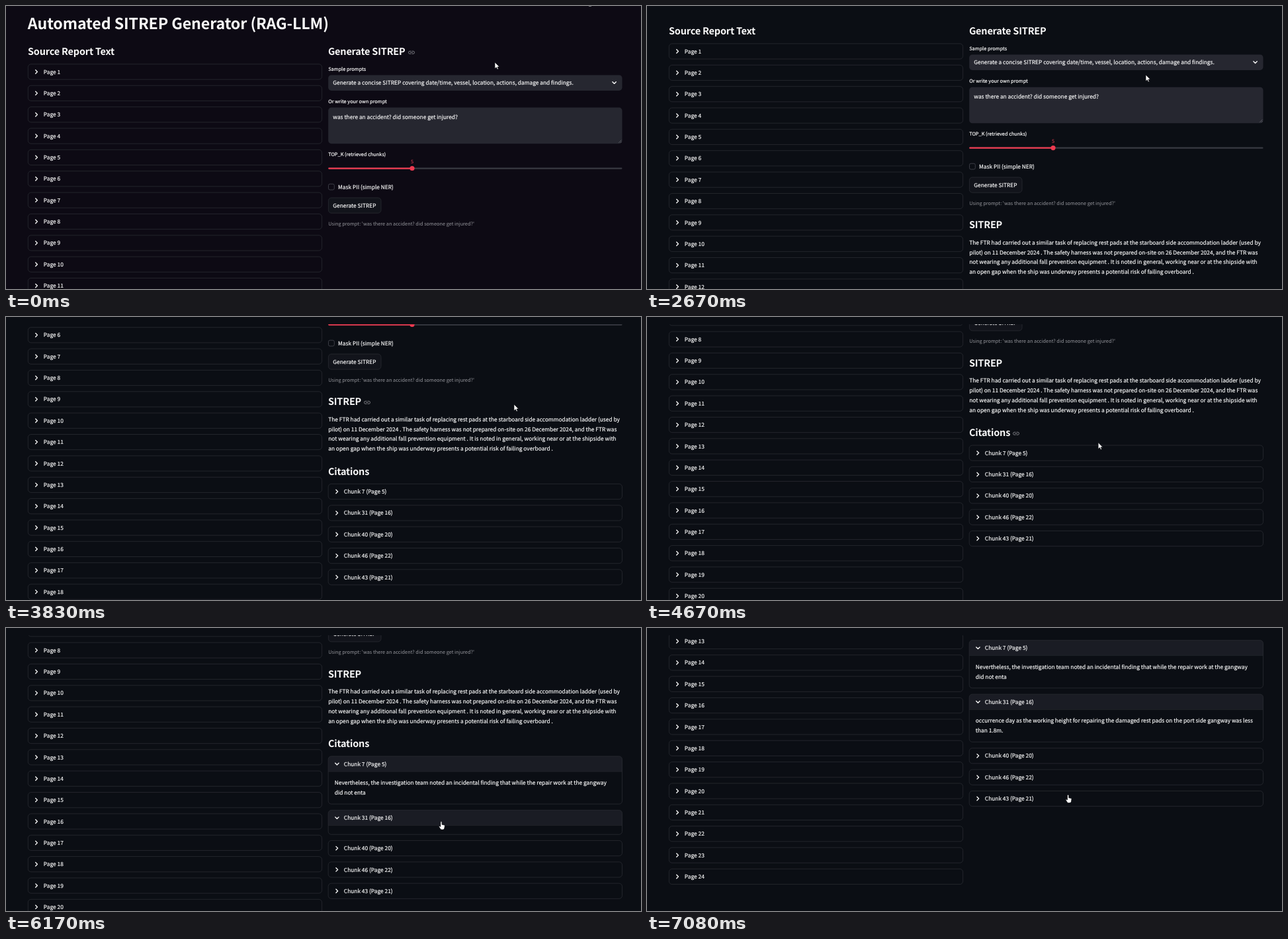
An HTML page that plays this animation: 960 px wide and 428 px high, repeating every 7160 ms.

```html
<!DOCTYPE html>
<html lang="en">
<head>
<meta charset="utf-8">
<title>Automated SITREP Generator</title>
<style>
  html, body { margin: 0; width: 100%; height: 100%; overflow: hidden; background: #0b0e14; }
  #stage { display: block; width: 960px; height: 428px; background: var(--bg); }
  text {
    font-family: "Noto Sans CJK SC", "Noto Sans CJK JP", "Noto Sans CJK", "Noto Sans", sans-serif;
    font-size: 8.375px; fill: #fafafa; stroke: #fafafa; stroke-width: .18;
    white-space: pre; text-rendering: geometricPrecision;
  }
  .h1 { font-size: 23.2px; font-weight: 700; letter-spacing: -.005em; stroke: none; }
  .h2 { font-size: 14.46px; font-weight: 600; letter-spacing: -.012em; stroke: none; }
  .small { font-size: 7.36px; }
  .dim { fill: #94959b; stroke: none; }
  .red { fill: #ee3a50; stroke: none; }
  .cover { fill: var(--bg); }
  .box { fill: none; stroke: #292b32; stroke-width: .8; }
  .field { fill: #262730; }
  .line { fill: none; stroke: #fafafa; stroke-width: 1.35; stroke-linecap: round; stroke-linejoin: round; }
  .link { fill: none; stroke: #7b7c82; stroke-width: 1; stroke-linecap: round; }
  .pointer { fill: #fff; stroke: #08090d; stroke-width: .7; stroke-linejoin: round; }
</style>
</head>
<body>
<svg id="stage" viewBox="0 0 960 428"></svg>
<script>
const LOOP = 7160, STEP = LOOP / 86;
const PITCH = 32.36, COL = 444.3, LEFT = 33.3, RIGHT = 487.2;
const stage = document.getElementById('stage');

function el(parent, tag, attrs) {
  const node = document.createElementNS('http://www.w3.org/2000/svg', tag);
  for (const key in attrs) node.setAttribute(key, attrs[key]);
  return parent.appendChild(node);
}
const group = parent => el(parent, 'g', {});
const path = (parent, cls, d) => el(parent, 'path', { class: cls, d });
const rect = (parent, cls, x, y, width, height, rx = 4.6) =>
  el(parent, 'rect', { class: cls, x, y, width, height, rx });
function text(parent, x, y, str, cls = '') {
  el(parent, 'text', { x, y, class: cls }).textContent = str;
}
const move = (node, x, y) => node.setAttribute('transform', `translate(${x} ${y})`);
const show = (node, on) => node.setAttribute('visibility', on ? 'visible' : 'hidden');

const rightArrow = x => `M${x - 1.3} -2.7l2.7 2.7l-2.7 2.7`;
const downArrow = (x, y) => `M${x - 2.7} ${y - 1.3}l2.7 2.7l2.7 -2.7`;

// Piecewise eased track: rows of [time, value, value...]
function sample(track, t) {
  let i = 0;
  while (i < track.length - 1 && track[i + 1][0] <= t) i++;
  const a = track[i], b = track[i + 1];
  if (!b || t <= a[0]) return a.slice(1);
  const u = (t - a[0]) / (b[0] - a[0]), k = u * u * (3 - 2 * u);
  return a.slice(1).map((v, j) => v + (b[j + 1] - v) * k);
}

const page = group(stage);

// Left column
text(page, LEFT - .5, 35.4, 'Automated SITREP Generator (RAG-LLM)', 'h1');
text(page, LEFT - .3, 74.4, 'Source Report Text', 'h2');
for (let i = 0; i < 24; i++) {
  const row = group(page);
  move(row, 0, 99.5 + i * PITCH);
  rect(row, 'box', LEFT, -11.6, COL, 23.2);
  path(row, 'line', rightArrow(46));
  text(row, 56.8, 3.1, `Page ${i + 1}`);
}

// Headings with an anchor icon while hovered
const headings = [];
function heading(parent, y, str, iconX) {
  text(parent, RIGHT - .3, y + 5.4, str, 'h2');
  const icon = path(parent, 'link',
    'M-1 -2h-1.5a2 2 0 0 0 0 4h1.5M1 -2h1.5a2 2 0 0 1 0 4h-1.5M-1.6 0h3.2');
  move(icon, iconX, y + 1.3);
  headings.push({ y, icon });
}

// Form
heading(page, 69, 'Generate SITREP', 613);
text(page, RIGHT, 97.6, 'Sample prompts', 'small');
rect(page, 'field', RIGHT, 104.5, COL, 23.4);
text(page, 494.3, 119.2, 'Generate a concise SITREP covering date/time, vessel, location, actions, damage and findings.');
path(page, 'line', downArrow(919.6, 116));
text(page, RIGHT, 146.7, 'Or write your own prompt', 'small');
rect(page, 'field', RIGHT, 153.6, COL, 54.6);
text(page, 494.3, 170.5, 'was there an accident? did someone get injured?');
path(page, 'link', 'M926.6 206.6l3.6 -3.6M929 206.8l1.4 -1.4').style.strokeWidth = .6;
text(page, RIGHT, 227, 'TOP_K (retrieved chunks)', 'small');
text(page, 611.9, 238.2, '5', 'small red');
rect(page, '', RIGHT, 244.4, COL, 2.3, 1.1).setAttribute('fill', '#383a42');
rect(page, 'red', RIGHT, 244.4, 126.9, 2.3, 1.1);
el(page, 'circle', { class: 'red', cx: 614, cy: 245.5, r: 3.6 });
rect(page, 'box', 487.5, 269.2, 8.8, 8.8, 2.2).style.stroke = '#484a52';
text(page, 502, 276.8, 'Mask PII (simple NER)');
rect(page, 'box', RIGHT + .2, 290, 79.6, 23.2).style.fill = '#12141b';
text(page, 494.3, 304.6, 'Generate SITREP');
text(page, RIGHT, 331.6, "Using prompt: 'was there an accident? did someone get injured?'", 'small dim');

// Answer
const title = group(page), answer = group(page);
heading(title, 362, 'SITREP', 546);
[
  'The FTR had carried out a similar task of replacing rest pads at the starboard side accommodation ladder (used by',
  'pilot) on 11 December 2024 . The safety harness was not prepared on-site on 26 December 2024, and the FTR was',
  'not wearing any additional fall prevention equipment . It is noted in general, working near or at the shipside with',
  'an open gap when the ship was underway presents a potential risk of failing overboard .'
].forEach((str, i) => text(answer, RIGHT, 391.6 + i * 14.92, str));
heading(answer, 467.3, 'Citations', 558);

// Citations; "open" is when the panel unfolds
const chunks = [
  { name: 'Chunk 7 (Page 5)', open: 4930, lines: [
    'Nevertheless, the investigation team noted an incidental finding that while the repair work at the gangway',
    'did not enta'] },
  { name: 'Chunk 31 (Page 16)', open: 6085, lines: [
    'occurrence day as the working height for repairing the damaged rest pads on the port side gangway was less',
    'than 1.8m.'] },
  { name: 'Chunk 40 (Page 20)' },
  { name: 'Chunk 46 (Page 22)' },
  { name: 'Chunk 43 (Page 21)' }
];
for (const c of chunks) {
  c.row = group(answer);
  c.head = path(c.row, '', `M${RIGHT} 11.4V-7a4.6 4.6 0 0 1 4.6 -4.6h${COL - 9.2}a4.6 4.6 0 0 1 4.6 4.6V11.4z`);
  c.head.setAttribute('fill', '#1a1c24');
  c.frame = rect(c.row, 'box', RIGHT, -11.6, COL, 23.2);
  c.shut = path(c.row, 'line', rightArrow(500.2));
  c.down = path(c.row, 'line', downArrow(500.4, 0));
  text(c.row, 510.8, 3.1, c.name);
  c.body = el(c.row, 'svg', { y: 11, width: 960, height: 0, overflow: 'hidden' });
  path(c.body, 'box', `M${RIGHT} .4h${COL}`);
  (c.lines || []).forEach((str, i) => text(c.body, 496.8, 20.6 + i * 14.92, str));
}

// Top bar hides scrolled content
rect(stage, 'cover', 0, 0, 960, 11, 0);
const busy = rect(stage, '', 0, 0, 4, 1, 0);
busy.setAttribute('fill', '#6c6d72');

const arrow = path(stage, 'pointer', 'M0 0V9.8L2.3 7.7L3.8 11L5.4 10.3L4 7.1H7Z');
const hand = path(stage, 'pointer',
  'M-1.1 .8Q-1 -.4 0 -.4T1.1 .8V4.2L4.6 5Q5.5 5.3 5.4 6.4L4.8 10Q4.4 12 2.5 12H.8Q-.6 12 -1.4 10.8L-3.4 7.6Q-3.8 6.6 -2.8 6.4L-1.1 7.4Z');

const tintTrack = [[0, 13, 10, 20], [670, 11, 14, 20]];
const scrollTrack = [
  [2580, 0], [2660, 30.8], [2750, 58.4], [2995, 116.8], [3330, 175.2],
  [3400, 175.2], [3580, 234], [3835, 234], [4160, 292.4], [6750, 292.4], [7070, 467.8]
];
const mouseTrack = [
  [0, 739, 85], [670, 734, 74], [950, 734, 74], [1415, 731, 69], [1600, 731, 69],
  [1745, 754, 104], [2664, 754, 104], [3300, 764, 124], [3740, 768, 132], [4420, 768, 132],
  [4750, 664, 202], [5010, 662, 203], [5325, 672, 185], [5745, 655, 290], [5920, 655, 290],
  [5990, 658, 293], [6240, 658, 293], [6660, 676, 167], [6745, 676, 167], [7070, 636.6, 252.6]
];

function draw(t) {
  const [scroll] = sample(scrollTrack, t);
  const [mx, my] = sample(mouseTrack, t);
  const docY = my + scroll;
  stage.style.setProperty('--bg', `rgb(${sample(tintTrack, t).map(Math.round)})`);
  move(page, 0, -scroll);
  title.style.display = t > 1660 ? '' : 'none';
  answer.style.display = t > 1745 ? '' : 'none';
  for (const h of headings) show(h.icon, Math.abs(docY - h.y) < 17.5);

  let y = 498, over = false;
  for (const c of chunks) {
    const [k] = c.open ? sample([[c.open, 0], [c.open + 220, 1]], t) : [0];
    move(c.row, 0, y);
    c.frame.setAttribute('height', 23.2 + 49 * k);
    c.body.setAttribute('height', 49 * k);
    show(c.head, k > 0);
    show(c.down, k > 0);
    show(c.shut, !k);
    over = over || (t > 1745 && Math.abs(docY - y) < 11.6);
    y += PITCH + 49.2 * k;
  }

  show(busy, t < 1660);
  move(busy, 879.5 + 1.5 * Math.cos(t / 120), 0);
  move(arrow, mx, my);
  move(hand, mx, my);
  show(arrow, !over);
  show(hand, over);
}

function tick() {
  const t = performance.now() % LOOP;
  draw(Math.min(85, Math.floor((t + 4) / STEP)) * STEP);
  requestAnimationFrame(tick);
}
tick();
</script>
</body>
</html>
```
